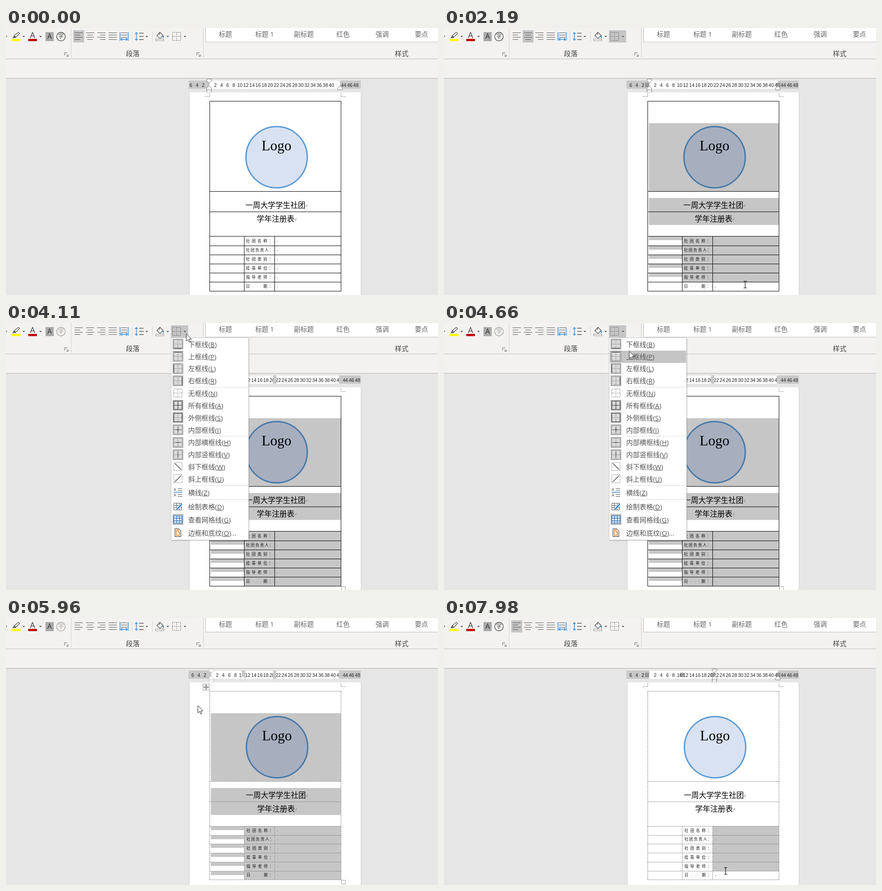
Animation, 951 px wide and 589 px high, one loop 8000 ms. Source, as an HTML page:

```html
<!DOCTYPE html>
<html lang="zh-CN">
<head>
<meta charset="utf-8">
<title>表格边框</title>
<style>
html, body { margin: 0; width: 100%; height: 100%; overflow: hidden; background: #e6e6e6; }
svg { display: block; width: 951px; height: 589px; }
text { white-space: pre; }
.ui { font-family: "Open Sans", "Noto Sans CJK SC", "Noto Sans CJK", sans-serif; }
.doc { font-family: "Noto Sans CJK SC", "Noto Sans CJK", sans-serif; }
.small { font-weight: 500; }
.num { font-family: "Liberation Sans", sans-serif; }
.logo { font-family: "Liberation Serif", serif; }
</style>
</head>
<body>
<svg id="stage" viewBox="0 0 951 589" xmlns="http://www.w3.org/2000/svg"></svg>
<script>
const LOOP = 8000;
const SEL = '#c6c6c6', INK = '#444', BLUE = '#2b88d8';

// ---- markup helpers ----
const rect = (x, y, w, h, fill, more = '') => `<rect x="${x}" y="${y}" width="${w}" height="${h}" fill="${fill}" ${more}/>`;
const line = (d, color = INK, w = 1, more = '') => `<path d="${d}" fill="none" stroke="${color}" stroke-width="${w}" ${more}/>`;
const shape = (d, fill, more = '') => `<path d="${d}" fill="${fill}" ${more}/>`;
const text = (x, y, s, size, fill = INK, cls = 'ui', more = '') =>
  `<text x="${x}" y="${y + size * 0.37}" font-size="${size}" fill="${fill}" class="${cls}" ${more}>${s}</text>`;
const mid = 'text-anchor="middle"';
const group = (id, body, more = '') => `<g id="${id}" ${more}>${body}</g>`;
const crisp = v => Math.floor(v) + 0.5;
const caretDown = x => shape(`M${x - 3} 17.5h6l-3 3z`, '#555');

// ---- ribbon ----
const bars = (x, spans) => line(spans.map(([a, b], i) => `M${x + a} ${10.5 + i * 5}H${x + b}`).join(''), '#555', 1.2);
const launcher = x => line(`M${x - 4} 60.5V54.5H${x + 2}M${x - 1} 57.5L${x + 3.5} 62M${x + 4} 58.5V62.5H${x}`, '#666');

function borderIcon(x, y, bold = '') {
  const dash = 'stroke-dasharray="2 2"';
  const lines = {
    B: 'M0 18H18', P: 'M0 0H18', L: 'M0 0V18', R: 'M18 0V18', O: 'M0 0H18V18H0Z',
    H: 'M3 9H15', V: 'M9 3V15', h: 'M0 9H18', v: 'M9 0V18', D: 'M2 2L16 16', U: 'M2 16L16 2'
  };
  const solid = [...bold].map(k => lines[k]).join('');
  return `<g transform="translate(${crisp(x - 9)} ${crisp(y - 9)})">` +
    line('M0 0H18V18H0Z', '#555', 1, dash) +
    (/[DU]/.test(bold) ? '' : line('M0 9H18M9 0V18', '#666', 1, dash)) +
    line(solid, '#333', 1.2) + '</g>';
}

function ribbon() {
  let s = rect(0, 0, 951, 110, '#f3f2f1') + rect(0, 67.5, 951, 1.5, '#cfcdcb') + rect(0, 110, 951, 2, '#cfcdcb');
  s += line('M143.5 0V65M434.5 0V65', '#d2d0ce') + line('M277.5 7V31M322.5 7V31', '#d8d6d4');
  s += group('hlLeft', rect(148, 5, 24, 27, '#c5c5c5')) + group('hlMid', rect(173, 5, 24, 27, '#c5c5c5')) +
    group('hlBorder', rect(363, 5, 38, 27, '#c5c5c5'));
  // highlighter, font colour, shading, circled character
  s += shape('M0 17.5h3l-3 3z', '#555') + rect(12, 24, 20, 5, '#ffff00');
  s += line('M18 17L27 9.5L30 12L22 20ZM18 17L15.5 21.5H20L22 20', '#555', 1.3) + shape('M16 21.5l2.5-4 3 2.6-1.5 1.4z', '#666');
  s += text(58.5, 15.5, 'A', 18, INK, 'ui', mid) + rect(49, 24, 19, 5, '#c00000');
  s += rect(87, 9, 18, 20, '#a9a9a9') + text(96, 18.5, 'A', 15.5, '#333', 'ui', mid);
  s += group('ring', `<circle cx="121" cy="19" r="9.5" fill="none" stroke="currentColor" stroke-width="1.3"/>` +
    text(121, 19, '字', 12, 'currentColor', 'ui', mid));
  // paragraph tools
  s += bars(151, [[0, 18], [0, 12], [0, 18], [0, 12]]) + bars(176, [[0, 18], [3, 15], [0, 18], [3, 15]]) +
    bars(201, [[0, 18], [6, 18], [0, 18], [6, 18]]) + bars(226, [[0, 18], [0, 18], [0, 18], [0, 18]]);
  s += bars(253, [[0, 14], [0, 14], [0, 14]]) + line('M251 9V28M269 9V28M253 25H267M256 22L253 25L256 28M264 22L267 25L264 28', BLUE, 1.4);
  s += line('M287 10V27M284 13L287 10L290 13M284 24L287 27L290 24', BLUE, 1.4) + line('M293 11.5H303M293 18.5H303M293 25.5H303', '#555', 1.3);
  s += line('M332 17L339 9.5L346 16.5L339 23ZM338 9V15', '#555', 1.3) + shape('M345 16q4 3 2 6q-3 0-2-6z', BLUE) +
    rect(329.5, 24.5, 18, 3.5, '#fff', 'stroke="#888"');
  s += borderIcon(375.5, 18) + [39, 76, 310, 356, 394].map(caretDown).join('');
  s += text(279, 56, '段落', 15, INK, 'ui', mid) + text(871, 56, '样式', 15, INK, 'ui', mid) + launcher(133) + launcher(424);
  // style gallery
  s += rect(439.5, -2, 520, 33, '#fff', 'stroke="#bebbb8"');
  ['标题', '标题 1', '副标题', '红色', '强调', '要点'].forEach((name, i) => { s += text(483 + i * 86.3, 14, name, 14.6, '#666', 'ui', mid); });
  return s;
}

// ---- ruler ----
const tri = (x, y, up, c = '#777') =>
  shape(up ? `M${x} ${y}l5 5v4h-10v-4z` : `M${x - 5} ${y}h10v4l-5 5l-5-5z`, '#fff', `stroke="${c}"`);
const indent = (x, c) => tri(x, 112.5, false, c) + tri(x, 127.5, true, c) + rect(x - 5, 136.5, 10, 5.5, '#fff', `stroke="${c || '#777'}"`);
const gridMark = x => rect(x, 121, 8, 9, '#777') +
  line(`M${x + 2.5} 121v9M${x + 5.5} 121v9M${x} 123.5h8M${x} 126.5h8`, '#bbb', 0.8);

function ruler(zero, left, over) {
  let s = rect(402, 116, 379, 18, '#c8c8c8') + rect(left, 116, 735 - left, 18, '#fff');
  for (let n = -6; n <= 48; n += 2)
    if (n && !(n === 42 && zero < 450)) s += text(zero + n * 6.72, 126, Math.abs(n), 10.5, '#222', 'num', mid);
  return s + over;
}

// ---- document ----
const labels = ['社团名称：', '社团负责人：', '社团类别：', '挂靠单位：', '指导老师：'];
const ROWS = { solid: [459, 480, 500, 520, 540, 560, 580], dash: [459, 479, 498, 518, 538, 558, 577] };
const retMark = (x, y) => line(`M${x + 3} ${y - 4}v4h-3.5m1.7-1.7l-1.7 1.7l1.7 1.7`, '#888', 0.9);
const cellMark = (x, y) => line(`M${x - 1.5} ${y}h3M${x} ${y - 1.5}v3`, '#aaa', 0.8);

function selection(mode) {
  const r = ROWS[mode], tag = i => `class="sel" data-row="${i}"`;
  let s = rect(451, 210, 286, 150, SEL, tag(0)) + rect(451, 375, 286, 30, SEL, tag(1)) + rect(451, 405, 286, 29.5, SEL, tag(2));
  for (let i = 0; i < 6; i++) {
    const h = r[i + 1] - r[i];
    s += `<g ${tag(i + 3)}>` + rect(451, r[i] + 1, 73, 8, SEL) + rect(525, r[i], 66, h, SEL) + '</g>';
    s += rect(592, r[i], 145, h, SEL, `class="col" data-row="${i + 3}"`);
  }
  return s;
}

function table(mode) {
  const r = ROWS[mode], end = r[6] + 0.5, dx = mode === 'dash' ? 1 : 0;
  const cuts = [161, 360, 405, ...r].map(y => `M448 ${y + 0.5}H738`).join('');
  const d = cuts + `M448.5 161V${end}M737.5 161V${end}M524.5 ${r[0]}V${end}M591.5 ${r[0]}V${end}`;
  let s = selection(mode);
  s += dx ? line(d, '#808080', 1, 'stroke-dasharray="3 1.4"') : line(d, '#000');
  s += `<circle class="disc" cx="${595.7 + dx}" cy="285" r="67.5" stroke-width="3"/>`;
  s += text(595.5 + dx, 258.6, 'Logo', 31, '#000', 'logo', mid);
  s += text(527 + dx, 390.5, '一周大学学生社团', 16.5, '#000', 'doc') + retMark(660 + dx, 393);
  s += text(552 + dx, 420.5, '学年注册表', 16.6, '#000', 'doc') + retMark(636 + dx, 423);
  for (let i = 0; i < 6; i++) {
    const y = r[i + 1] - 9.8;
    const label = (x, str, gap) => text(x + dx, y, str, 8.6, '#111', 'doc small', `letter-spacing="${gap}"`);
    if (i < 5) s += label(528.3, labels[i], labels[i].length > 5 ? 1.7 : 4.1);
    else s += label(528.3, '日', 0) + label(566.4, '期：', 4.1) +
      [544, 553, 561].map(x => rect(x + dx, y, 1, 1, '#888')).join('');
    s += (dx ? '' : cellMark(590, y + 1)) + cellMark(597 + dx, y + 1);
  }
  return s;
}

const handle = rect(432.5, 145.5, 14, 14, '#fff', 'stroke="#999"') +
  line('M439.5 148V157M435 152.5H444', '#333') +
  shape('M439.5 147l2 2h-4zM439.5 158l2-2h-4zM434 152.5l2-2v4zM445 152.5l-2-2v4z', '#333');

// ---- border menu: label, key, centre, icon, checked ----
const items = [
  ['下框线', 'B', 48, 'B', 1], ['上框线', 'P', 75, 'P', 1], ['左框线', 'L', 101.5, 'L', 1], ['右框线', 'R', 128.5, 'R', 1],
  ['无框线', 'N', 156, '', 0], ['所有框线', 'A', 183, 'Ohv', 1], ['外侧框线', 'S', 210, 'O', 1], ['内部框线', 'I', 237, 'HV', 1],
  ['内部横框线', 'H', 264.5, 'H', 1], ['内部竖框线', 'V', 291.5, 'V', 1], ['斜下框线', 'W', 318, 'D', 0], ['斜上框线', 'U', 345, 'U', 0],
  ['横线', 'Z', 375, 'rule', 0], ['绘制表格', 'D', 406.5, 'draw', 0], ['查看网格线', 'G', 435, 'grid', 1], ['边框和底纹', 'O', 464, 'page', 0]
];
const special = {
  rule: y => text(369, y - 7, 'A', 9) + text(369, y + 5, 'A', 9) +
    line(`M378 ${y - 9.5}H388M378 ${y - 5.5}H388M378 ${y + 3.5}H388M378 ${y + 7.5}H388`, '#555') + line(`M369 ${y - 1.5}H388`, BLUE, 1.5),
  draw: y => line(`M369.5 ${y - 9}H386.5V${y + 6}H369.5ZM369.5 ${y - 4}H386.5M369.5 ${y + 1}H386.5M375.5 ${y - 9}V${y + 6}M381.5 ${y - 9}V${y + 6}`, '#555') +
    line(`M377 ${y + 4}L387 ${y - 7}`, '#fff', 5) + line(`M377 ${y + 4}L387 ${y - 7}`, BLUE, 3),
  grid: y => rect(369.5, y - 9.5, 18, 16, '#fff') +
    line(`M369.5 ${y - 9.5}h18v16h-18zM369.5 ${y - 4.5}h18M369.5 ${y + 1.5}h18M375.5 ${y - 9.5}v16M381.5 ${y - 9.5}v16`, '#2b6fb5', 1.5),
  page: y => line(`M372 ${y - 10}H380L385 ${y - 5}V${y + 7}H372Z`, '#555', 1.3) + line(`M375 ${y - 7}H379V${y - 3}H382V${y + 4}H375Z`, '#e07b1f', 1.5)
};

function menu() {
  let s = rect(365, 34, 171, 447, '#000', 'opacity=".13"') + rect(363.5, 32.5, 170.5, 446, '#fff', 'stroke="#c6c6c6"');
  s += rect(365, 0, 168, 27, '#c5c5c5', 'id="hover"');
  s += line('M402 141.5H533M402 249.5H533M402 358.5H533M402 389.5H533', '#dcdcdc');
  for (const [name, key, y, icon, on] of items) {
    if (on) s += rect(367.5, crisp(y - 12.5), 22, 22, '#dadada', 'stroke="#808080"');
    s += special[icon] ? special[icon](y) : borderIcon(378.5, y - 1.5, icon);
    const dots = key === 'O' ? '...' : '';
    s += text(401, y - 0.7, `${name}(<tspan text-decoration="underline">${key}</tspan>)${dots}`, 14.8, '#555');
  }
  return s;
}

const svg = document.getElementById('stage');
svg.innerHTML =
  rect(0, 0, 951, 589, '#e6e6e6') + ribbon() +
  group('rulerA', ruler(447.6, 448, indent(447) + tri(735.5, 127.5, true))) +
  group('rulerB', ruler(451.4, 452, gridMark(443) + gridMark(732) + indent(452) + tri(735, 127.5, true))) +
  group('rulerC', ruler(451.4, 452, rect(519, 116, 8, 18, '#c8c8c8') + rect(588, 116, 7, 18, '#c8c8c8') +
    rect(733, 116, 8, 18, '#c8c8c8') + indent(452, '#c0c0c0') + tri(521.5, 127.5, true, '#c0c0c0'))) +
  group('rulerD', ruler(451.4, 452, [443, 520, 588, 732].map(gridMark).join('') + indent(595.5) + tri(735, 127.5, true))) +
  rect(403, 142, 378.5, 447, '#fff') + line('M403.5 142V589M781.5 142V589', '#cfcfcf') +
  line('M437 151.5H448.5V143M748 151.5H737.5V143', '#a6a6a6') +
  group('solid', table('solid')) + group('dash', table('dash')) +
  group('grip', rect(431, 143, 17, 9, '#fff') + handle) +
  group('size', rect(738.5, 581.5, 8.5, 8, '#fff', 'stroke="#999"')) +
  group('caret', rect(597, 482, 1, 12, '#000')) +
  group('menu', menu()) +
  group('arrow', shape('M0 0V16L3.7 12.6L6.3 18.5L8.8 17.4L6.2 11.7H11.3Z', '#fff', 'stroke="#222"')) +
  group('beam', line('M-3.5 -7.5H-1L0 -6.5L1 -7.5H3.5M0 -6.5V6.5M-3.5 7.5H-1L0 6.5L1 7.5H3.5', '#111', 1.2));

const $ = id => document.getElementById(id);
const show = (el, on) => { el.style.display = on ? '' : 'none'; };
const parts = ['solid', 'dash'].map(id => ({
  root: $(id), disc: $(id).querySelector('.disc'), sel: [...$(id).querySelectorAll('.sel')], col: [...$(id).querySelectorAll('.col')]
}));

// ---- pointer: start, end, steps, then [progress, x, y] stops ----
const moves = [
  [220, 850, 9, [0, 800, 610], [0.3, 740, 520], [0.65, 580, 400], [1, 490, 332]],
  [1480, 2240, 11, [0, 490, 332], [0.5, 575, 440], [10 / 11, 663, 566], [1, 665, 570]],
  [2380, 2410, 2, [0, 665, 570], [1, 665, 574]],
  [2890, 3640, 11, [0, 665, 574], [2 / 11, 490, 343], [0.45, 400, 180], [0.7, 364, 80], [1, 392, 37]],
  [3710, 3890, 3, [0, 392, 37], [1, 397, 24]],
  [4490, 5120, 9, [0, 397, 24], [0.4, 410, 70], [0.8, 426, 145], [1, 428, 160]],
  [5960, 6590, 9, [0, 428, 160], [0.2, 418, 220], [0.55, 560, 430], [0.8, 678, 514], [1, 631, 488]],
  [6900, 7050, 3, [0, 631, 488], [1, 613.5, 474]],
  [7370, 7980, 9, [0, 613.5, 474], [0.6, 617, 522], [1, 620, 558]]
];

function pointer(t) {
  let at = [0, -50, -50];
  for (const [t0, t1, n, ...stops] of moves) {
    if (t < t0) break;
    const p = Math.min(1, (Math.floor((t - t0) / (t1 - t0) * (n - 1) + 1e-6) + 1) / n);
    const k = Math.max(1, stops.findIndex(s => s[0] >= p - 1e-9));
    const a = stops[k - 1], b = stops[k], q = (p - a[0]) / (b[0] - a[0]);
    at = [p, a[1] + (b[1] - a[1]) * q, a[2] + (b[2] - a[2]) * q];
  }
  return at.slice(1);
}

const lastRow = (tops, y) => tops.filter(top => y - 8 >= top).length - 1;

function render(t) {
  const [x, y] = pointer(t);
  const within = (a, b) => t >= a && t < b;
  const open = within(4040, 5490), preview = within(5060, 5490), dashed = t >= 5060;
  const picked = within(2650, 6760);

  show($('hlLeft'), t < 1090 || t >= 6760);
  show($('hlMid'), within(1090, 2650));
  show($('hlBorder'), within(1090, 5490));
  $('ring').style.color = picked ? '#a0a0a0' : '#444';
  show($('rulerA'), t < 1090);
  show($('rulerB'), within(1090, 2650));
  show($('rulerC'), picked);
  show($('rulerD'), t >= 6760);

  // last selected row; 0 is the logo row
  let last = -1, from = 0, side = false;
  if (within(1480, 2650)) {
    last = lastRow([161, 360, 405, ...ROWS.solid.slice(0, 6)], y);
    if (last < 1) last = -1;
  } else if (picked && !preview) last = 8;
  else if (t >= 7370) {
    side = true; from = 3;
    last = lastRow(ROWS.dash.slice(0, 6), y) + 3;
  }
  parts.forEach((p, i) => {
    show(p.root, dashed === (i === 1));
    const on = el => +el.dataset.row >= from && +el.dataset.row <= last;
    p.sel.forEach(el => show(el, !side && on(el)));
    p.col.forEach(el => show(el, on(el)));
    const dark = !side && last >= 0;
    p.disc.setAttribute('fill', dark ? '#a7afbf' : '#d9e2f3');
    p.disc.setAttribute('stroke', dark ? '#4678a8' : '#5b9bd5');
  });

  const grips = within(1090, 1480) || within(2650, 7370);
  show($('grip'), grips);
  $('grip').setAttribute('transform', `translate(${dashed ? 1 : 0} 0)`);
  show($('size'), grips && !preview);
  $('size').setAttribute('transform', `translate(0 ${dashed ? -3 : 0})`);
  show($('caret'), within(6760, 7370));

  show($('menu'), open);
  const hot = items.find(it => open && y > 34 && Math.abs(y - it[2]) <= 13.5);
  show($('hover'), hot);
  if (hot) $('hover').setAttribute('y', hot[2] - 14);

  show($('arrow'), picked);
  show($('beam'), t >= 220 && !picked);
  $(picked ? 'arrow' : 'beam').setAttribute('transform', `translate(${x} ${y})`);
}

const start = performance.now();
function tick() {
  render((performance.now() - start) % LOOP);
  requestAnimationFrame(tick);
}
render(0);
requestAnimationFrame(tick);
</script>
</body>
</html>
```
